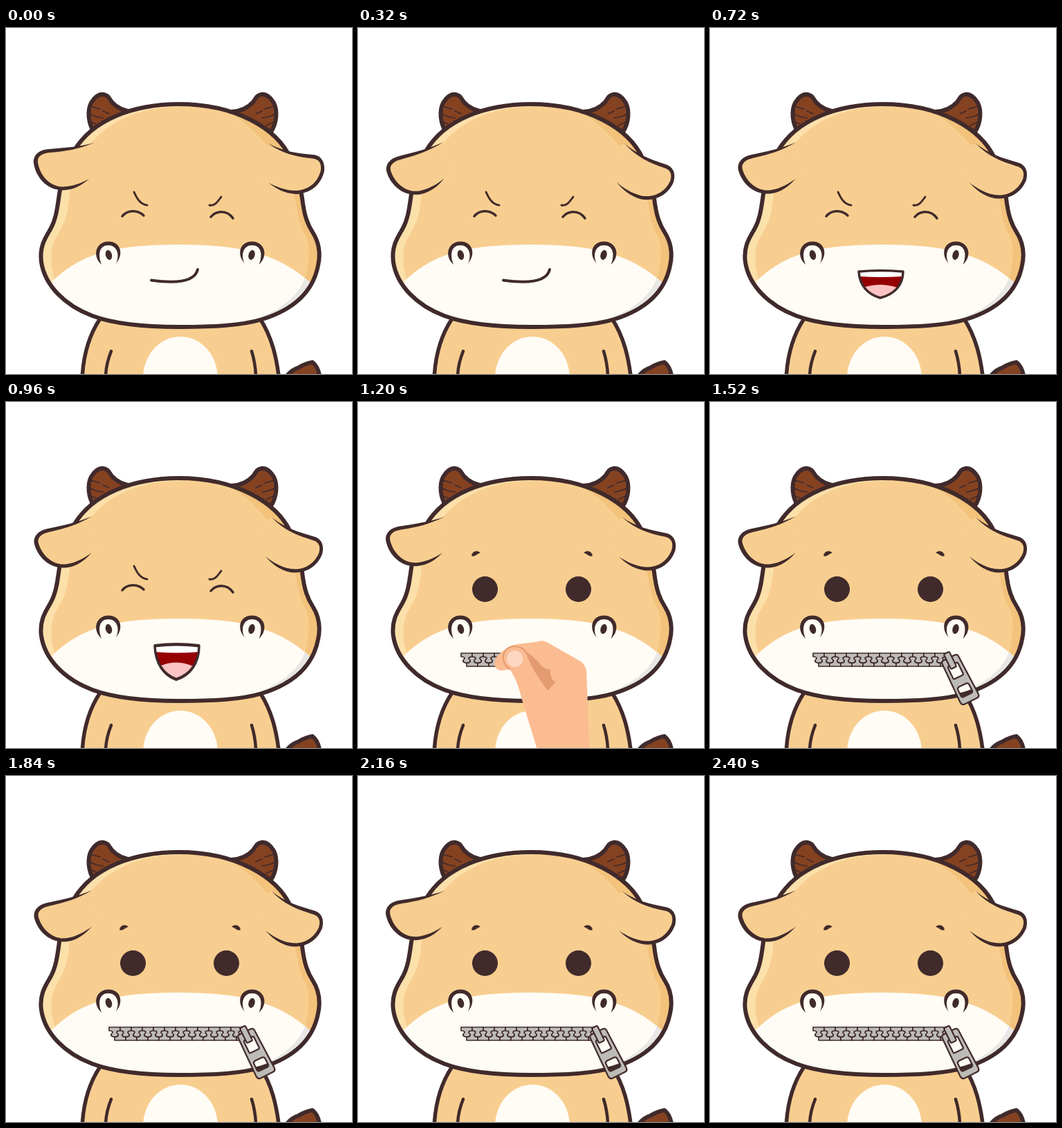
Recreate the animation shown at these times as an HTML page. Size 500 by 500 pixels, loop 2480 ms.

```html
<!DOCTYPE html>
<html lang="en">
<head>
<meta charset="utf-8">
<title>Zipped calf</title>
<style>
  html, body { margin: 0; width: 100%; height: 100%; overflow: hidden; background: #fff; }
  svg { display: block; width: 100vw; height: 100vh; }
  .ink { fill: #402a2b; }
  .coat { fill: #f8ce90; }
  .cream { fill: #fffcf5; }
  .horn { fill: #854221; }
  .metal { fill: #bdbbb8; }
  .line { stroke: #402a2b; stroke-width: 6; stroke-linecap: round; stroke-linejoin: round; }
  .thin { stroke-width: 3.5; }
  .hair { stroke-width: 1.7; }
  .open { fill: none; }
</style>
</head>
<body>
<svg viewBox="0 0 500 500">
  <defs>
    <path id="skull" d="M250 110C330 110 392 144 412 190C423 215 426 232 428 246C431 272 436 284 443 295C452 309 455 325 451 343C443 385 412 408 370 421C340 430 300 432 250 432C205 432 160 429 125 416C85 401 56 372 51 338C48 316 57 303 64 291C72 277 74 262 77 240C80 222 85 200 98 178C125 132 185 110 250 110Z"/>
    <clipPath id="skullClip"><use href="#skull"/></clipPath>
    <clipPath id="zipClip"><rect id="zipMask" x="147" y="355" width="0" height="35"/></clipPath>
    <g id="horn">
      <path class="horn line" d="M127 150C119 138 117 120 123 108C128 100 134 95 141 96C148 97 149 102 153 107C160 115 170 120 184 121Z"/>
      <path class="line open hair" d="M122 113L136 117M121 124Q129 129 140 130M124 136L134 141M140 120L149 124"/>
    </g>
    <g id="nostril">
      <path class="ink" d="M138 342C123 328 131 308.500 148 308.500C165 308.500 171 326 159 340Z"/>
      <path class="cream" d="M138 342C132 327 135 314 148 314C160 314 165 327 159 340Q148 349 138 342Z"/>
      <ellipse class="ink" cx="148.500" cy="328" rx="4.500" ry="7.200" transform="rotate(-15 148.500 328)"/>
    </g>
    <path id="tooth" class="metal line hair" d="M0 363h16v5c-5 0-6 2-4 4c3 3 0 5-4 5s-7-2-4-5c2-2 1-4-4-4z"/>
  </defs>

  <path class="coat line" style="stroke-width:5.500" d="M136 420C120 444 111 475 110 510H395C391 475 384 446 367 420Z"/>
  <ellipse class="cream" cx="252" cy="506" rx="54" ry="60"/>
  <path class="line open" style="stroke-width:4.500" d="M152 467Q144 487 144 505M355 467Q361 487 361 505"/>
  <path class="horn line" d="M402 508Q410 495 422 491Q434 484 443 483Q452 490 454 508Z"/>

  <use href="#horn"/>
  <use href="#horn" transform="matrix(-1 0 0 1 510 0)"/>

  <g clip-path="url(#skullClip)">
    <rect x="40" y="100" width="430" height="340" fill="#fce0aa"/>
    <path class="coat" d="M250 114C190 114 139 137 112 182C97 207 93 230 91 248C88 276 83 284 75 298C61 320 64 345 72 368L120 450H480V90H320Z"/>
    <path fill="#f3c27b" d="M300 112C330 122 365 148 390 188C412 222 417 240 420 258C423 278 427 288 433 300C440 316 439 336 432 362L480 400V90Z"/>
    <path class="cream" d="M64 369C105 328 150 313 250 313C345 313 395 328 441 369L470 460H40Z"/>
    <path fill="#e9e7e5" d="M432 361C423 389 392 411 350 425L420 440L470 400L441 369Z"/>
  </g>
  <use href="#skull" class="line open"/>

  <g id="earL">
    <path class="ink" d="M127 166C105 172 85 173 62 175C46 176 39 185 40 195C42 212 56 234 82 234.500C98 234 110 227 120 218Z"/>
    <path class="coat" d="M127 166C105 175 88 178 64 180C51 181 45 186 46 194C48 209 60 229 82 229.500C97 229 109 224 120 218L130 214V169Z"/>
  </g>
  <g id="earR">
    <path class="ink" d="M379 167C400 178 420 181 443 183C456 184 461 194 460 206C457 222 444 239 419 240C402 239 390 232 380 224Z"/>
    <path class="coat" d="M379 167C400 182 420 186 442 188.500C452 189 456 195 455 205C452 219 441 234 419 235C404 235 392 230 380 224L372 220V171Z"/>
  </g>

  <use href="#nostril"/>
  <use href="#nostril" transform="matrix(-1 0 0 1 503.500 0)"/>

  <g id="squint" class="line open thin">
    <path d="M168 272C175 263 190 262 199 271M296 273C303 264 319 262 328 275"/>
    <path style="stroke-width:3" d="M185 237C189 246 194 255 204 256M311 244C306 251 301 258 294 256"/>
  </g>
  <g id="stare" class="ink">
    <circle cx="183.500" cy="270.500" r="18.500"/>
    <circle cx="318.500" cy="270.500" r="18.500"/>
    <path d="M164 222C165 216 172 213 177 218C172 219 170 223 166 223ZM339 222C338 216 331 213 326 218C331 219 333 223 337 223Z"/>
  </g>

  <path id="smile" class="line open" style="stroke-width:4" d="M210 364.500C235 368 272 370 277 349"/>
  <g id="laugh">
    <path fill="#950003" d="M215 352Q246 349 279 352C279 372 266 385 246 390C228 385 216 372 215 352Z"/>
    <path fill="#fff" d="M215 352Q246 349 279 352L277 359Q246 361 217 359Z"/>
    <path fill="#fcc3c4" d="M222 375Q246 367 270 375Q262 386 246 390Q230 386 222 375Z"/>
    <path class="line open thin" d="M215 352Q246 349 279 352C279 372 266 385 246 390C228 385 216 372 215 352Z"/>
  </g>

  <g id="zip" clip-path="url(#zipClip)"></g>
  <g id="pull" class="metal line" transform="translate(361 401) rotate(-26)">
    <path style="stroke-width:2.200" fill-rule="evenodd" d="M-9-35H9Q13-35 13-31L15 30Q15 35 10 35H-9Q-14 35-14 30L-13-31Q-13-35-9-35ZM-6-24Q-8-24-8-22V-6Q-8-4-6-4H6Q8-4 8-6V-22Q8-24 6-24ZM-5 9Q-9 9-9 13V22Q-9 25-6 25H6Q9 25 9 22V13Q9 9 5 9Z"/>
    <rect style="stroke-width:2.200" x="-5" y="-43" width="9" height="24" rx="2"/>
  </g>

  <g id="hand">
    <path fill="#fbbc92" d="M196 376C197 368 205 362 212 357C222 348 240 350 265 345Q271 346 275 349L321 375Q329 381 329 392L333 500H257L235 428C231 412 228 402 218 386C212 387 203 391 198 384Q195 380 196 376Z"/>
    <path fill="#e59b72" d="M243 361L257 373C263 380 266 386 277 387C275 394 279 401 284 405L273 417C262 402 252 388 246 374Z"/>
    <path fill="none" stroke="#e59b72" stroke-width="2.200" stroke-linecap="round" d="M218 386C203 375 206 355 224 353C241 353 244 366 248 376"/>
    <ellipse cx="225.500" cy="371" rx="11.500" ry="12" fill="#fdd7c1"/>
  </g>
</svg>
<script>
  const LOOP = 2480, STEP = 80;
  const LAUGH = 400, GRAB = 1040, RELEASE = 1480;
  const FLAP = 560, LEFT_DEG = 9.8, RIGHT_DEG = 13;
  const ZIP_X = 149, ZIP_LEN = 196, PITCH = 16;
  const $ = id => document.getElementById(id);
  const show = (id, on) => { $(id).style.display = on ? '' : 'none'; };
  const move = (id, value) => $(id).setAttribute('transform', value);

  let teeth = '';
  for (let i = 0; i < 12; i++) {
    const x = ZIP_X + i * PITCH;
    teeth += `<use href="#tooth" transform="translate(${x + PITCH / 2} 745) scale(1 -1)"/>` +
             `<use href="#tooth" x="${x}"/>`;
  }
  $('zip').innerHTML = teeth;

  function draw(t) {
    const flap = Math.abs(Math.sin(Math.PI * t / FLAP));
    move('earL', `rotate(${-LEFT_DEG * flap} 121 192)`);
    move('earR', `rotate(${RIGHT_DEG * flap} 381 196)`);

    const zipped = t >= GRAB, held = zipped && t < RELEASE;
    show('squint', !zipped);
    show('stare', zipped);
    show('smile', t < LAUGH);
    show('laugh', t >= LAUGH && !zipped);
    show('zip', zipped);
    show('hand', held);
    show('pull', t >= RELEASE);

    const gape = 1 + 0.28 * (1 - Math.cos(2 * Math.PI * (t - LAUGH) / 320));
    move('laugh', `translate(0 ${351 * (1 - gape)}) scale(1 ${gape})`);

    const p = Math.min(1, Math.max(0, (t - GRAB) / (RELEASE - GRAB)));
    const run = ZIP_LEN * (1 - Math.cos(Math.PI * p)) / 2;
    $('zipMask').setAttribute('width', run + 4);
    move('hand', `translate(${run - 56} 0)`);
  }

  const start = performance.now();
  function tick() {
    const t = (performance.now() - start) % LOOP;
    draw(Math.floor(t / STEP) * STEP);
    requestAnimationFrame(tick);
  }
  tick();
</script>
</body>
</html>
```
